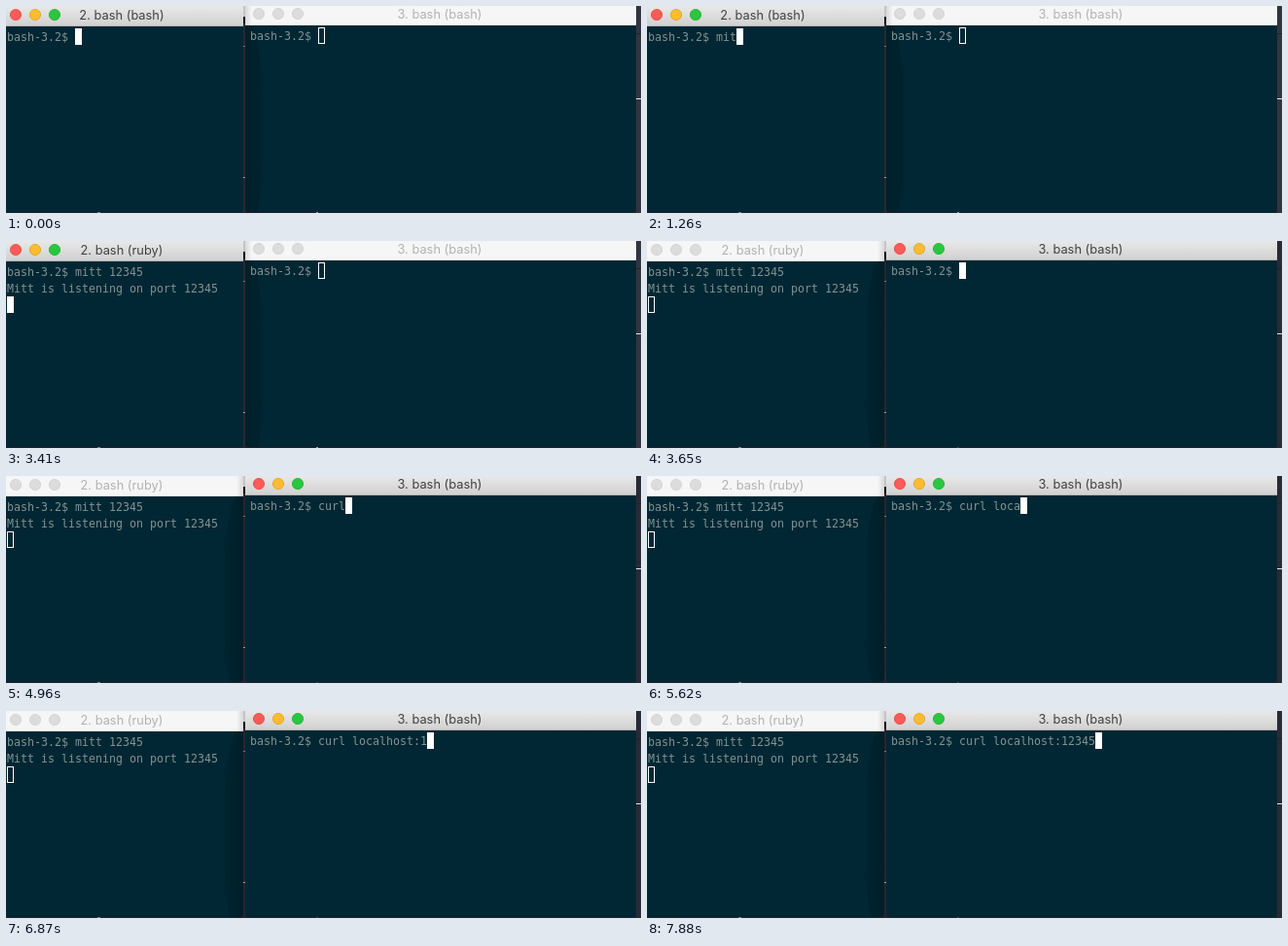
These frames come from a looping animation (653 px wide and 213 px high, 8 s). An HTML page with a canvas:

```html
<!DOCTYPE html>
<html lang="en">
<head>
<meta charset="utf-8">
<title>Two terminals</title>
<style>
  html, body { margin: 0; width: 100%; height: 100%; overflow: hidden; background: #20222e; }
  canvas { display: block; width: 653px; height: 213px; }
</style>
</head>
<body>
<canvas id="stage"></canvas>
<script>
const W = 653, H = 213, LOOP = 8000;
const CELL = 7, LINE = 17, BOTTOM = 212, PROMPT = 'bash-3.2$ ';
const MONO = '11.63px "DejaVu Sans Mono", monospace';
const SANS = '12.85px Inter, sans-serif';
const SCREEN = '#002733';

const canvas = document.getElementById('stage');
const ratio = window.devicePixelRatio || 1;
canvas.width = W * ratio;
canvas.height = H * ratio;
const ctx = canvas.getContext('2d');
ctx.scale(ratio, ratio);

// Key press times, one per typed character
const SERVER = {
  text: 'mitt 12345',
  keys: [780, 1080, 1260, 1440, 1560, 1800, 1890, 1970, 2150, 2510]
};
const CLIENT = {
  text: 'curl localhost:12345',
  keys: [4610, 4660, 4840, 4960, 5080, 5200, 5380, 5500, 5620, 5740,
         5850, 5950, 6050, 6150, 6450, 6870, 7100, 7340, 7640, 7880]
};
const ENTER = 2930, RETITLE = 3230, OUTPUT = 3410, SWITCH = 3650;

const LEFT = { x: 0, w: 244, bar: 21, mid: 119, textX: 1, textY: 23, lights: 10, lightY: 9 };
const RIGHT = { x: 246, w: 402, bar: 20, mid: 446, textX: 251, textY: 22, lights: 260, lightY: 8 };

function rect(x, y, w, h, color) {
  ctx.fillStyle = color;
  ctx.fillRect(x, y, w, h);
}

function typed(command, t) {
  return PROMPT + command.text.slice(0, command.keys.filter(k => k <= t).length);
}

function drawDesktop(rightActive) {
  rect(0, 0, W, H, '#20222e');
  rect(244, 0, 2, H, rightActive ? '#2a2530' : '#262a33');
  rect(244, 0, 2, 11, '#c4c4c6');
  rect(244, 11, 2, 7, '#08090c');
  rect(244, 41, 2, 1, '#6d7780');
  rect(244, 176, 2, 1, '#9aa3a8');
  rect(648, 0, 5, H, rightActive ? '#292a36' : '#323440');
  rect(648, 28, 5, 1, '#20212b');
  rect(648, 95, 5, 1, '#e4e5e8');
  rect(94, 212, 3, 1, '#7c838b');
  rect(319, 211, 2, 2, rightActive ? '#454a55' : '#a0a5ab');
}

function drawLights(win, active) {
  const colors = active ? ['#fc5b57', '#fdbc2f', '#29c73f'] : ['#dcdcdc', '#dcdcdc', '#dcdcdc'];
  const rims = active ? ['#e04843', '#dfa023', '#1dad2b'] : ['#d0d0d0', '#d0d0d0', '#d0d0d0'];
  colors.forEach((color, i) => {
    ctx.beginPath();
    ctx.arc(win.lights + i * 20, win.lightY, 5.6, 0, Math.PI * 2);
    ctx.fillStyle = color;
    ctx.fill();
    ctx.lineWidth = 0.8;
    ctx.strokeStyle = rims[i];
    ctx.stroke();
  });
}

function drawBar(win, title, active) {
  const shade = ctx.createLinearGradient(0, 0, 0, win.bar);
  shade.addColorStop(0, active ? '#e8e8e8' : '#f6f6f6');
  shade.addColorStop(1, active ? '#d0d0d0' : '#f6f6f6');
  rect(win.x, 0, win.w, win.bar, shade);
  rect(win.x, win.bar - 1, win.w, 1, active ? '#b5b5b5' : '#e2e2e2');
  drawLights(win, active);
  ctx.font = SANS;
  ctx.textAlign = 'center';
  ctx.fillStyle = active ? '#404040' : '#b2b2b2';
  ctx.fillText(title, win.mid, win.lightY + 5);
}

function drawWindow(win, title, lines, active) {
  ctx.save();
  ctx.beginPath();
  ctx.roundRect(win.x, -6, win.w, BOTTOM + 6, [0, 0, 4, win.x ? 4 : 0]);
  ctx.clip();
  rect(win.x, 0, win.w, H, SCREEN);
  drawBar(win, title, active);
  if (!active) drawShadow(win);
  ctx.restore();

  ctx.font = MONO;
  ctx.textAlign = 'left';
  ctx.fillStyle = '#829293';
  lines.forEach((line, i) => ctx.fillText(line, win.textX, win.textY + 13 + i * LINE));

  const cx = win.textX + lines[lines.length - 1].length * CELL;
  const cy = win.textY + (lines.length - 1) * LINE;
  if (active) {
    rect(cx, cy, CELL, LINE, '#fff');
  } else {
    ctx.lineWidth = 1;
    ctx.strokeStyle = '#fff';
    ctx.strokeRect(cx + 0.5, cy + 0.5, CELL - 1, LINE - 1);
  }
}

// Shade cast on the inactive window by its neighbour
function drawShadow(win) {
  const edge = win === LEFT ? 244 : 246;
  const dir = win === LEFT ? -1 : 1;
  const reach = win === LEFT ? 18 : 17;
  const far = edge + dir * reach;
  ctx.beginPath();
  ctx.moveTo(edge, win.bar);
  ctx.lineTo(edge + dir * reach * 0.45, win.bar);
  ctx.quadraticCurveTo(far, 48, far, 85);
  ctx.lineTo(far, 165);
  ctx.quadraticCurveTo(far, 192, edge + dir * reach * 0.75, BOTTOM);
  ctx.lineTo(edge, BOTTOM);
  ctx.fillStyle = '#00222c';
  ctx.fill();

  const soft = ctx.createLinearGradient(edge, 0, edge + dir * 7, 0);
  soft.addColorStop(0, 'rgba(0,0,0,0.12)');
  soft.addColorStop(1, 'rgba(0,0,0,0)');
  rect(Math.min(edge, edge + dir * 7), 0, 7, BOTTOM, soft);
}

function draw(t) {
  const rightActive = t >= SWITCH;
  const output = [typed(SERVER, t)];
  if (t >= OUTPUT) output.push('Mitt is listening on port 12345');
  if (t >= ENTER) output.push('');

  drawDesktop(rightActive);
  drawWindow(LEFT, t < RETITLE ? '2. bash (bash)' : '2. bash (ruby)', output, !rightActive);
  drawWindow(RIGHT, '3. bash (bash)', [typed(CLIENT, t)], rightActive);
}

const start = performance.now();
function frame() {
  draw((performance.now() - start) % LOOP);
  requestAnimationFrame(frame);
}
frame();
</script>
</body>
</html>
```
